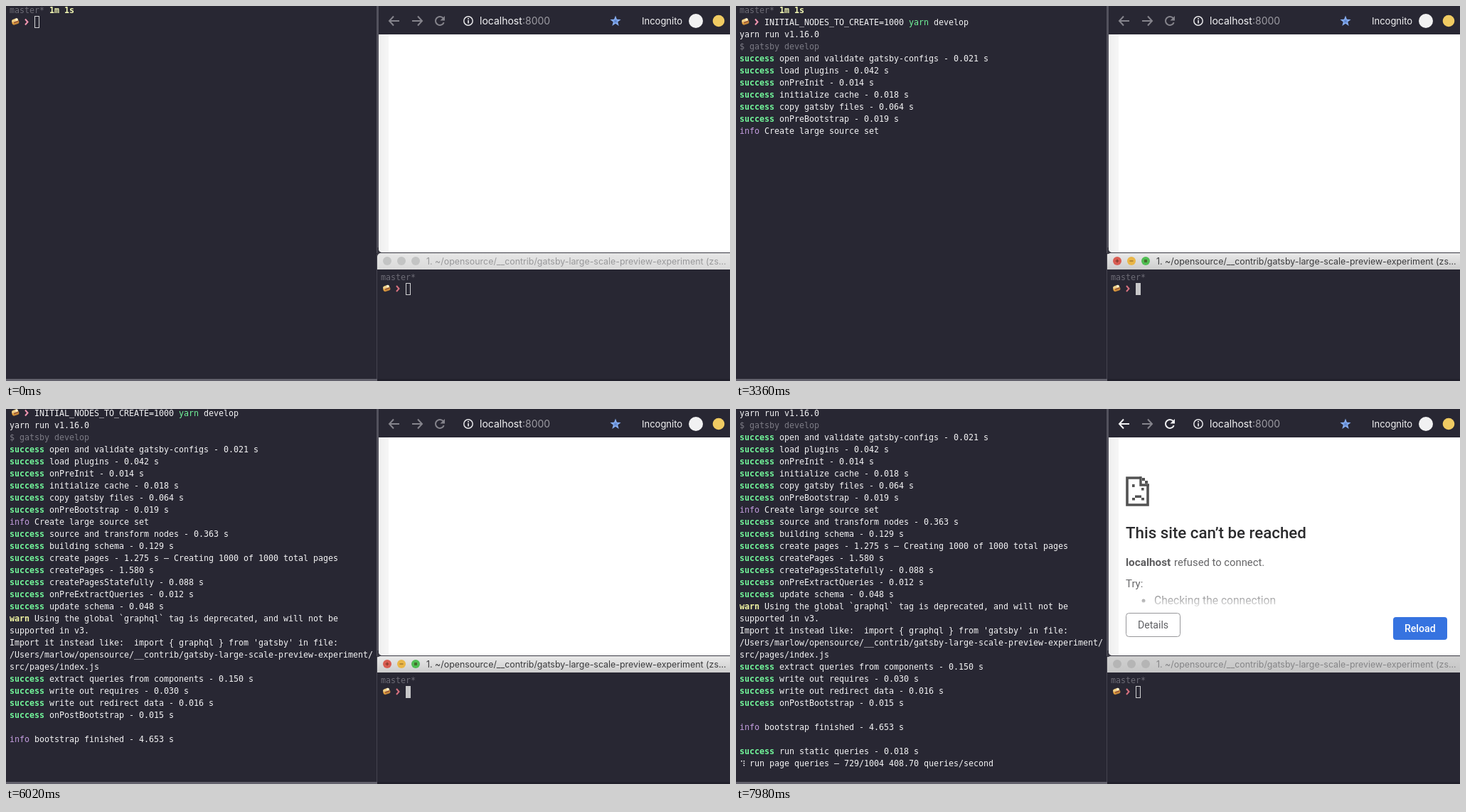
Write an HTML page with a canvas that moves like this. It is 1018 px wide and 528 px high and loops after 8000 ms.

```html
<!DOCTYPE html>
<html lang="en">
<head>
<meta charset="utf-8">
<title>Develop server start-up</title>
<style>
  html, body { margin: 0; width: 100%; height: 100%; overflow: hidden; background: #282733; }
  canvas { display: block; }
</style>
</head>
<body>
<canvas id="stage" width="1018" height="528"></canvas>
<script>
const ctx = document.getElementById('stage').getContext('2d');
const LOOP = 8000, STEP = 70;
const COL = 7, ROW = 17, ROWS = 30;
const MONO = '11.63px "DejaVu Sans Mono", monospace';
const UI = 'Inter, sans-serif';
const PAGE = 'Roboto, sans-serif';
const BG = '#282733', WHITE = '#f4f4f5', DIM = '#6d6c76';
const TAGS = { success: '#72f59a', info: '#c39ddf', warn: '#f3f7a4' };

// Finished terminal lines: time, tag, text
const LOGS = [
  [980, '', 'yarn run v1.16.0'],
  [1050, 'dim', '$ gatsby develop'],
  [2940, 'success', 'open and validate gatsby-configs - 0.021 s'],
  [3150, 'success', 'load plugins - 0.042 s'],
  [3150, 'success', 'onPreInit - 0.014 s'],
  [3220, 'success', 'initialize cache - 0.018 s'],
  [3290, 'success', 'copy gatsby files - 0.064 s'],
  [3360, 'success', 'onPreBootstrap - 0.019 s'],
  [3360, 'info', 'Create large source set'],
  [3710, 'success', 'source and transform nodes - 0.363 s'],
  [3850, 'success', 'building schema - 0.129 s'],
  [5250, 'success', 'create pages - 1.275 s – Creating 1000 of 1000 total pages'],
  [5460, 'success', 'createPages - 1.580 s'],
  [5600, 'success', 'createPagesStatefully - 0.088 s'],
  [5670, 'success', 'onPreExtractQueries - 0.012 s'],
  [5740, 'success', 'update schema - 0.048 s'],
  [5810, 'warn', 'Using the global `graphql` tag is deprecated, and will not be'],
  [5810, '', 'supported in v3.'],
  [5810, '', "Import it instead like:  import { graphql } from 'gatsby' in file:"],
  [5810, '', '/Users/marlow/opensource/__contrib/gatsby-large-scale-preview-experiment/'],
  [5810, '', 'src/pages/index.js'],
  [5880, 'success', 'extract queries from components - 0.150 s'],
  [5950, 'success', 'write out requires - 0.030 s'],
  [5950, 'success', 'write out redirect data - 0.016 s'],
  [6020, 'success', 'onPostBootstrap - 0.015 s'],
  [6020, '', ''],
  [6020, 'info', 'bootstrap finished - 4.653 s'],
  [6020, '', ''],
  [6160, 'success', 'run static queries - 0.018 s'],
];

// Running activities: from, to, label, spinner start
const LIVE = [
  [3220, 3290, 'copy gatsby files'],
  [3290, 3360, 'onPreBootstrap'],
  [3430, 3710, 'source and transform nodes', 3710],
  [3710, 3850, 'building schema'],
  [3850, 5460, 'createPages', 4060],
  [3990, 5250, createdPages, 4060],
  [5460, 5600, 'createPagesStatefully'],
  [5600, 5670, 'onPreExtractQueries'],
  [5670, 5740, 'update schema'],
  [5740, 5880, 'extract queries from components'],
  [5880, 5950, 'write out requires'],
  [6090, 6160, 'run static queries'],
  [6160, LOOP, pageQueries],
];

// Braille spinner, one bit per dot
const SPIN = [0x0b, 0x19, 0x39, 0x38, 0x3c, 0x34, 0x26, 0x27, 0x07, 0x0f];

function createdPages(t) {
  const n = Math.round(132 + (t - 4130) * 0.784);
  return `create pages – Creating ${n} of 1000 total pages`;
}

function pageQueries(t) {
  const k = (t - 6160) / 910;
  const n = Math.round(k <= 1 ? 328 * k : 328 + 401 * (k - 1));
  const secs = k <= 1 ? 0.91684 * k : 0.91684 + 0.86686 * (k - 1);
  return `run page queries – ${n}/1004 ${(secs ? n / secs : 0).toFixed(2)} queries/second`;
}

function rect(x, y, w, h, color) {
  ctx.fillStyle = color;
  ctx.fillRect(x, y, w, h);
}

function round(x, y, w, h, r, color) {
  ctx.beginPath();
  ctx.roundRect(x, y, w, h, r);
  ctx.fillStyle = color;
  ctx.fill();
}

function disc(x, y, r, color) {
  ctx.beginPath();
  ctx.arc(x, y, r, 0, Math.PI * 2);
  ctx.fillStyle = color;
  ctx.fill();
}

function line(points, color, width) {
  ctx.beginPath();
  points.forEach(([x, y]) => ctx.lineTo(x, y));
  ctx.strokeStyle = color;
  ctx.lineWidth = width;
  ctx.stroke();
}

function text(str, x, y, color, font) {
  ctx.font = font;
  ctx.fillStyle = color;
  ctx.fillText(str, x, y);
}

function mono(str, x, y, color, bold) {
  text(str, x, y, color, bold ? 'bold ' + MONO : MONO);
}

function fade(x0, y0, x1, y1, from, to) {
  const g = ctx.createLinearGradient(x0, y0, x1, y1);
  g.addColorStop(0, from);
  g.addColorStop(1, to);
  return g;
}

// Food emoji and chevron; y is the text baseline
function prompt(x, y, color) {
  ctx.save();
  ctx.translate(x + 8, y - 5);
  ctx.rotate(-0.35);
  round(-5, -2, 10, 6, 2.5, '#c98a3c');
  round(-4.5, -4, 9, 5, 2.5, '#f0cf86');
  rect(-4, 0, 8, 1.5, '#8f4a30');
  ctx.restore();
  disc(x + 10, y - 8, 1.8, '#fbf1d2');
  disc(x + 5, y - 3, 1.3, '#e8a93f');
  line([[x + 22, y - 8.5], [x + 25.5, y - 4.5], [x + 22, y - 0.5]], color, 2);
}

function cursor(x, y, solid) {
  if (solid) return rect(x, y - 12.5, 7, 17, '#c8c8c9');
  ctx.strokeStyle = '#d2d2d4';
  ctx.lineWidth = 1;
  ctx.strokeRect(x + 0.5, y - 12.5, 6, 16);
}

function spinner(y, age) {
  const bits = SPIN[Math.floor(Math.max(0, age) / 80) % SPIN.length];
  for (let i = 0; i < 6; i++) {
    if (bits >> i & 1) rect(i < 3 ? 7 : 10.5, y - 8 + (i % 3) * 3, 1.6, 1.6, WHITE);
  }
}

function drawLog(tag, str, y) {
  const color = TAGS[tag];
  if (color) mono(tag, 5, y, color, tag !== 'info');
  mono(str, color ? 5 + (tag.length + 1) * COL : 5, y, tag === 'dim' ? '#7c7b85' : WHITE);
}

function leftTerminal(t) {
  rect(0, 0, 522, 528, BG);
  const logs = LOGS.filter(l => t >= l[0]);
  const live = LIVE.filter(l => t >= l[0] && t < l[1]);
  const total = 2 + logs.length + live.length + (live.length ? 0 : 1);
  const scroll = Math.max(0, total - ROWS);
  const base = row => 10 + (row - scroll) * ROW;

  mono('master*', 5, base(0), DIM);
  mono('1m 1s', 61, base(0), '#f3f8b4', true);
  prompt(5, base(1), '#f094b0');
  const typed = t >= 560;
  if (typed) {
    mono('INITIAL_NODES_TO_CREATE=1000', 40, base(1), WHITE);
    mono('yarn', 243, base(1), TAGS.success);
    mono('develop', 278, base(1), WHITE);
  }
  logs.forEach(([, tag, str], i) => drawLog(tag, str, base(2 + i)));
  live.forEach(([from, , label, start = from], i) => {
    const y = base(2 + logs.length + i);
    spinner(y, t - start);
    mono(typeof label === 'function' ? label(t) : label, 19, y, WHITE);
  });

  if (t < 770) cursor(typed ? 327 : 40, base(1), t >= 210);
  else if (t < 1680) cursor(5, base(2 + logs.length), true);

  rect(0, 525, 522, 3, '#62616c');
}

function arrow(x, dir, color) {
  line([[x - 7 * dir, 21], [x + 7 * dir, 21]], color, 2);
  line([[x + dir, 14.5], [x + 7 * dir, 21], [x + dir, 27.5]], color, 2);
}

function reloadIcon(color) {
  ctx.beginPath();
  ctx.arc(610, 21, 6, 0.35, Math.PI * 1.78);
  ctx.strokeStyle = color;
  ctx.lineWidth = 2;
  ctx.stroke();
  ctx.beginPath();
  ctx.moveTo(617, 14);
  ctx.lineTo(617, 20.5);
  ctx.lineTo(610.5, 20.5);
  ctx.fillStyle = color;
  ctx.fill();
}

function star(x, y, r, color) {
  ctx.beginPath();
  for (let i = 0; i < 10; i++) {
    const a = i * Math.PI / 5 - Math.PI / 2, d = i % 2 ? r * 0.42 : r;
    ctx.lineTo(x + d * Math.cos(a), y + d * Math.sin(a));
  }
  ctx.fillStyle = color;
  ctx.fill();
}

function toolbar(active) {
  const on = active ? '#f1f1f3' : '#85848c';
  rect(524, 0, 494, 40, BG);
  arrow(546, -1, on);
  arrow(578, 1, '#85848c');
  reloadIcon(on);
  ctx.beginPath();
  ctx.arc(650, 21, 6.2, 0, Math.PI * 2);
  ctx.strokeStyle = '#e6e6e8';
  ctx.lineWidth = 1.5;
  ctx.stroke();
  rect(649.2, 20, 1.7, 4.5, '#e6e6e8');
  rect(649.2, 17, 1.7, 1.8, '#e6e6e8');
  text('localhost', 666, 26, '#f4f4f5', '14px ' + UI);
  text(':8000', 726, 26, '#9d9ca3', '14px ' + UI);
  star(857, 21.5, 8, '#86aef2');
  star(857, 21.5, 3.5, '#5f86cf');
  text('Incognito', 894, 26, '#f4f4f5', '13px ' + UI);
  disc(970, 21, 10, '#f1f1f2');
  disc(1002, 21, 8.3, '#f0cb62');
}

function sadPage() {
  const c = '#535353';
  line([[570, 97], [550, 97], [550, 135], [579, 135], [579, 107]], c, 3.6);
  line([[569, 95], [569, 107], [581, 107]], c, 3.4);
  rect(571, 97, 4, 4, c);
  rect(575, 101, 4, 4, c);
  rect(557, 106, 3.6, 4, c);
  rect(570, 111, 3.6, 3.6, c);
  rect(561, 121.5, 9, 3.5, c);
  rect(557, 125, 4, 3.5, c);
  rect(570, 125, 4, 3.5, c);
}

function errorPage() {
  sadPage();
  text('This site can’t be reached', 548, 182, '#2b2b2d', '500 22.3px ' + PAGE);
  text('localhost', 548, 221, '#5c5c5e', 'bold 15.3px ' + PAGE);
  text('refused to connect.', 616, 221, '#646466', '14.8px ' + PAGE);
  text('Try:', 548, 251, '#6a6a6c', '15px ' + PAGE);
  disc(573, 270, 2.5, '#6a6a6c');
  text('Checking the connection', 588, 275, '#6a6a6c', '15.6px ' + PAGE);
  rect(546, 256, 300, 28, fade(0, 258, 0, 282, 'rgba(255,255,255,0.1)', 'rgba(255,255,255,0.95)'));
  ctx.beginPath();
  ctx.roundRect(548.5, 287.5, 76, 33, 4);
  ctx.strokeStyle = '#97979a';
  ctx.lineWidth = 1;
  ctx.stroke();
  text('Details', 565, 309, '#5f6064', '14.1px ' + PAGE);
  round(924, 293, 76, 32, 4, '#3673e0');
  text('Reload', 940, 314, '#ffffff', '500 14.1px ' + PAGE);
}

function browser(t) {
  rect(521, 0, 3, 348, '#53525d');
  rect(522, 340, 496, 9, '#3a3943');
  round(524, 30, 500, 317, [0, 0, 0, 5], '#ffffff');
  round(524, 30, 14, 317, [0, 0, 0, 5], fade(524, 0, 538, 0, '#efefef', '#f6f6f6'));
  toolbar(t >= 6160);
  if (t >= 6300) errorPage();
}

function rightTerminal(t) {
  const active = t >= 2310 && t < 6160;
  rect(522, 360, 496, 168, BG);
  rect(521, 349, 1, 176, '#45444f');
  const bar = active ? ['#e9e9e9', '#cdcdcd'] : t < 2310 ? ['#e6e6e6', '#dadada'] : ['#d0d0d0', '#c6c6c6'];
  round(522, 348, 500, 23, [5, 0, 0, 0], fade(0, 348, 0, 371, ...bar));
  const lights = active ? ['#d95c52', '#e9b648', '#4fbd52'] : Array(3).fill(t < 2310 ? '#c3c4c4' : '#b5b5b5');
  lights.forEach((color, i) => {
    const x = 536 + i * 20;
    disc(x, 359, 6, color);
    if (!active) return;
    const mark = 'rgba(60,30,10,0.5)';
    if (i < 2) line([[x - 2.5, 359], [x + 2.5, 359]], mark, 1.2);
    if (i === 0) line([[x, 356.5], [x, 361.5]], mark, 1.2);
    if (i === 2) rect(x - 2, 357, 4, 4, mark);
  });
  text('1. ~/opensource/__contrib/gatsby-large-scale-preview-experiment (zs...', 591, 364,
    active ? '#3b3b3d' : t < 2310 ? '#98989a' : '#858587', '12.4px ' + UI);
  mono('master*', 527, 385.5, DIM);
  prompt(527, 402.5, '#d8717f');
  cursor(562, active ? 402.5 : 403, active);
  rect(522, 525, 496, 3, '#21202b');
}

function frame(now) {
  const t = Math.floor(now % LOOP / STEP) * STEP;
  leftTerminal(t);
  rightTerminal(t);
  browser(t);
  requestAnimationFrame(frame);
}

let origin;
requestAnimationFrame(function start(now) {
  origin = now;
  const tick = time => {
    const t = Math.floor((time - origin) % LOOP / STEP) * STEP;
    leftTerminal(t);
    browser(t);
    rightTerminal(t);
    requestAnimationFrame(tick);
  };
  tick(now);
});
</script>
</body>
</html>
```
